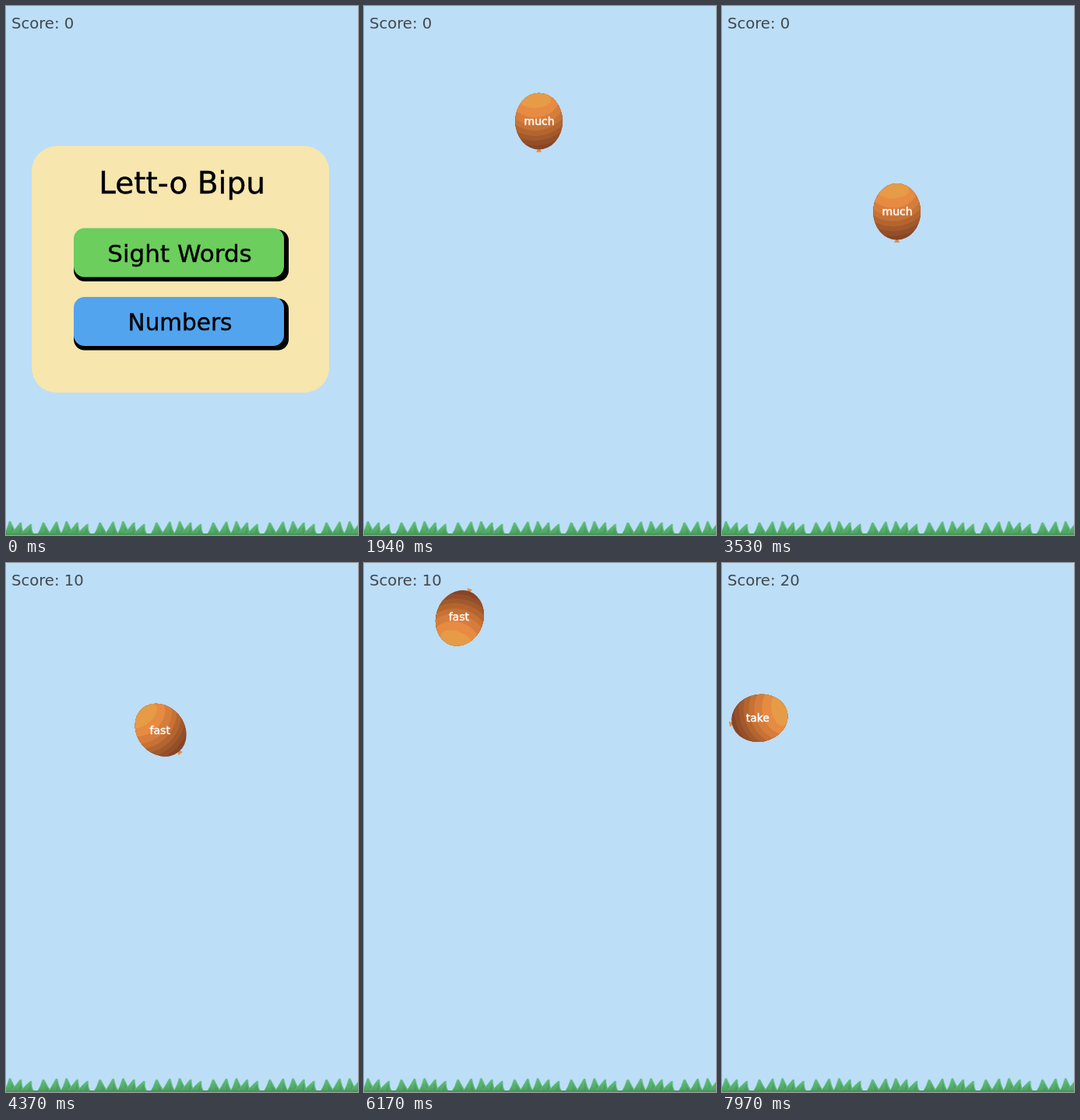
An HTML page that plays this animation: 452x680 px, repeating every 8 s.

```html
<!DOCTYPE html>
<html lang="en">
<head>
<meta charset="utf-8">
<title>Balloon words</title>
<style>
html, body { margin: 0; width: 100%; height: 100%; overflow: hidden; background: #bcdef7; }
svg { display: block; width: 100vw; height: 100vh; }
text { font-family: "DejaVu Sans", sans-serif; }
.mid { text-anchor: middle; }
</style>
</head>
<body>
<svg viewBox="0 0 452 680">
  <defs>
    <clipPath id="skin"><ellipse cy="-1" rx="30.4" ry="36.4"/></clipPath>
    <linearGradient id="leaf" x1="0" y1="0" x2="0" y2="1">
      <stop offset="0" stop-color="#62bd80"/>
      <stop offset=".6" stop-color="#52ad68"/>
      <stop offset="1" stop-color="#499859"/>
    </linearGradient>
  </defs>
  <rect width="452" height="680" fill="#bcdef7"/>
  <g id="grass"></g>
  <text id="score" x="7" y="29" font-size="19.6" fill="#43484c"></text>
  <g id="menu">
    <rect x="33" y="180" width="382" height="317" rx="32" fill="#f7e6ad"/>
    <text class="mid" x="226" y="241" font-size="39" stroke="#000" stroke-width=".4">Lett-o Bipu</text>
    <g id="buttons"></g>
    <path id="cursor" d="M0 0V16L4 12.5 6.5 18 9 17 6.5 11.5H11.500Z" fill="#111" stroke="#fff"/>
  </g>
  <g id="balloon">
    <g id="body">
      <path d="M-1 34L-3.500 38.500H3.500L1 34Z" fill="#dc8d49"/>
      <g id="bands" clip-path="url(#skin)"></g>
    </g>
    <text id="word" class="mid" y="4" font-size="14" fill="#fff" stroke="#fff" stroke-width=".45"></text>
  </g>
</svg>
<script>
const LOOP = 8000, START = 0.89, BUMP = 3.77, BUMP2 = 6.31, CEILING = 6.49;
const GRAVITY = 38, DRIFT = -42.2, SPIN = -67;
const $ = id => document.getElementById(id);

// Each leg of the flight: start time, height and vertical speed
const legs = [
  { t: START, y: 125, v: 3 },
  { t: BUMP, y: 291.6, v: -138 },
  { t: BUMP2, y: 63.6, v: -138 },
  { t: CEILING, y: 39.4, v: 80 }
];

function add(parent, tag, attrs, text = "") {
  const el = document.createElementNS("http://www.w3.org/2000/svg", tag);
  for (const key in attrs) el.setAttribute(key, attrs[key]);
  el.textContent = text;
  return $(parent).appendChild(el);
}

function button(y, fill, label, size, x) {
  const box = { x: 87, width: 270, height: 63, rx: 14 };
  add("buttons", "rect", { ...box, y: y + 5.5, width: 276, fill: "#000" });
  add("buttons", "rect", { ...box, y: y + 2, x: 93, fill: "#000" });
  add("buttons", "rect", { ...box, y, fill });
  add("buttons", "text", {
    class: "mid", x, y: y + 43, "font-size": size, stroke: "#000", "stroke-width": 0.4
  }, label);
}

function drawBalloon() {
  add("bands", "rect", { x: -40, y: -45, width: 80, height: 90, fill: "#874526" });
  const colors = ["#944f2a", "#a2592c", "#b4652f", "#c67236", "#d67d3d", "#e78b43", "#e69b47"];
  const edges = [31, 25, 19, 12, 5, -5, -17];
  edges.forEach((edge, i) => {
    const ry = edge + 28;
    add("bands", "ellipse", { cx: -5, cy: -29, rx: 12 + ry * 0.8, ry, fill: colors[i] });
  });
}

function drawGrass() {
  const blades = [[5, 662.5, -1], [19, 664, 4], [32, 666, 5], [48, 664, -1], [65, 663, 2]];
  for (let tile = -72.7; tile < 500; tile += 72.7) {
    for (const [bx, y, lean] of blades) {
      const x = bx + tile, foot = x - lean;
      add("grass", "path", {
        d: `M${foot - 10} 681Q${foot - 5} 674 ${x - 1} ${y}H${x + 1}Q${foot + 5} 674 ${foot + 10} 681Z`,
        fill: "url(#leaf)", stroke: "#75c49c", "stroke-width": 0.5
      });
      add("grass", "path", {
        d: `M${foot + 1} 680Q${foot + 2} 673 ${x} ${y + 3}L${foot + 5} 678Z`,
        fill: "#408c54", opacity: 0.4
      });
    }
  }
  add("grass", "rect", { y: 678, width: 452, height: 2, fill: "#4b965b" });
}

function show(el, on) {
  el.setAttribute("visibility", on ? "visible" : "hidden");
}

function moveCursor(t) {
  const p = Math.min(1, Math.max(0, (t - 0.43) / 0.3));
  const ease = p * p * (3 - 2 * p);
  $("cursor").setAttribute("transform", `translate(${400 - 122 * ease} ${388 - 64 * ease})`);
  $("cursor").setAttribute("opacity", t >= 0.43 ? 1 : 0);
}

function render(t) {
  const playing = t >= START;
  show($("menu"), !playing);
  show($("balloon"), playing);
  moveCursor(t);

  const hits = (t >= BUMP) + (t >= BUMP2);
  $("score").textContent = "Score: " + hits * 10;
  $("word").textContent = ["much", "fast", "take"][hits];
  $("word").setAttribute("x", hits ? -1.5 : 0.5);

  const leg = legs.filter(l => t >= l.t).pop() || legs[0];
  const s = t - leg.t, u = Math.max(0, t - BUMP);
  const y = leg.y + leg.v * s + GRAVITY * s * s / 2;
  $("balloon").setAttribute("transform", `translate(${224.6 + DRIFT * u} ${y})`);
  $("body").setAttribute("transform", `rotate(${SPIN * u})`);
}

button(285.5, "#6cce5c", "Sight Words", 31, 223);
button(374, "#52a4ef", "Numbers", 29.5, 223.5);
drawBalloon();
drawGrass();

const began = performance.now();
function frame() {
  render((performance.now() - began) % LOOP / 1000);
  requestAnimationFrame(frame);
}
frame();
</script>
</body>
</html>
```
